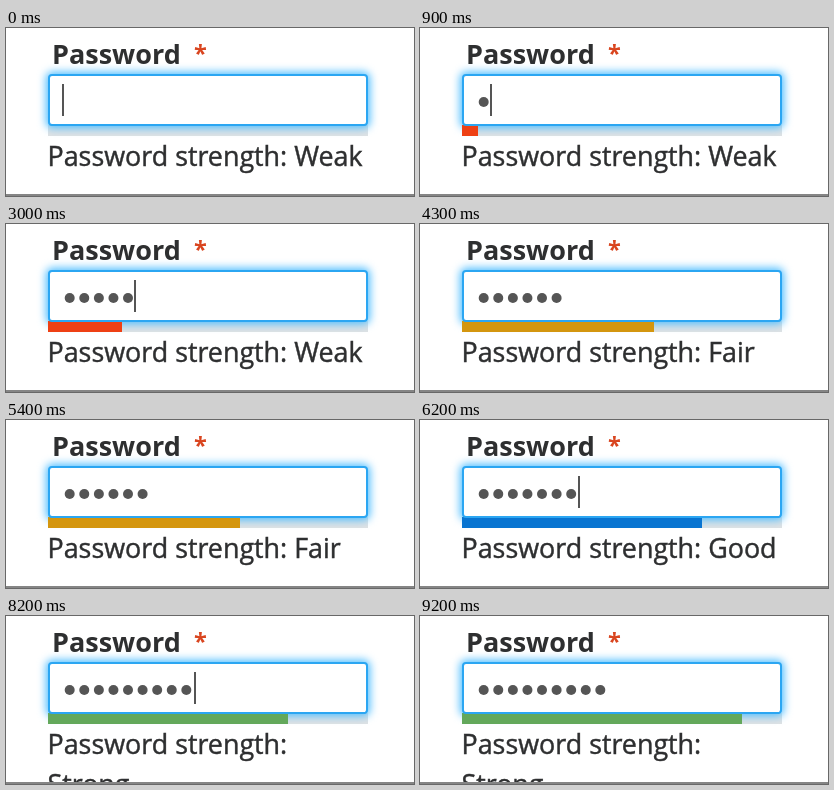
An HTML page that plays this animation: 408x168 px, repeating every 9.6 s.

```html
<!DOCTYPE html>
<html lang="en">
<head>
<meta charset="utf-8">
<title>Password strength</title>
<style>
  html, body { margin: 0; width: 100%; height: 100%; overflow: hidden; background: #fff; }
  svg { display: block; }
  text { font: 26.85px "Open Sans", "Noto Sans", sans-serif; fill: #2e2f30; stroke: #2e2f30; stroke-width: .45px; }
  .title { font-size: 27px; font-weight: 700; stroke: none; }
  .star { font-size: 23.5px; fill: #d9451f; }
  .glow { filter: blur(4px); }
</style>
</head>
<body>
<svg width="408" height="168" viewBox="0 0 408 168">
  <text class="title" x="46" y="36">Password</text>
  <text class="title star" x="188" y="33.5">*</text>
  <rect x="42" y="97" width="320" height="11" fill="#dfe2e4"/>
  <rect class="glow" x="40" y="44" width="324" height="56" rx="6" fill="#4dbdff"/>
  <rect id="bar" x="42" y="97" height="11"/>
  <rect x="43" y="47" width="318" height="50" rx="3" fill="#fff" stroke="#2ba6f2" stroke-width="2"/>
  <g id="dots" fill="#555"></g>
  <rect id="caret" y="56" width="2" height="32" fill="#555"/>
  <text id="label" x="41.5" y="137.5"></text>
  <text id="wrapped" x="41.5" y="177.5"></text>
  <rect y="166" width="408" height="2" fill="#858585"/>
</svg>
<script>
const LOOP = 9600, STEP = 100, GROW = 500, LAG = 50, PITCH = 14.58;
const $ = id => document.getElementById(id);
const levels = {
  Weak: '#ee4014', Fair: '#d4960f', Good: '#0874d1', Strong: '#63a85b'
};
// Key presses: time, meter percentage, rating
const keys = [
  [300, 5, 'Weak'], [1200, 10, 'Weak'], [1700, 15, 'Weak'],
  [2200, 20, 'Weak'], [2700, 25, 'Weak'], [3200, 60, 'Fair'],
  [5600, 75, 'Good'], [7200, 75, 'Good'], [8200, 87.5, 'Strong']
];
const caretOff = [[100, 300], [4300, 4800], [5300, 5600], [6600, 7100], [7700, 8200], [9200, LOOP]];

const dots = keys.map((_, i) => {
  const dot = document.createElementNS('http://www.w3.org/2000/svg', 'circle');
  dot.setAttribute('cx', 63.7 + i * PITCH);
  dot.setAttribute('cy', 74);
  dot.setAttribute('r', 5);
  return $('dots').appendChild(dot);
});

// CSS ease-out: cubic-bezier(0, 0, .58, 1)
function easeOut(x) {
  if (x <= 0) return 0;
  if (x >= 1) return 1;
  let lo = 0, hi = 1;
  for (let i = 0; i < 20; i++) {
    const u = (lo + hi) / 2;
    if (1.74 * u * u * (1 - u) + u ** 3 < x) lo = u; else hi = u;
  }
  return lo * lo * (3 - 2 * lo);
}

function draw(t) {
  const count = keys.filter(k => k[0] <= t).length;
  const [start, goal, level] = keys[count - 1] || [0, 0, 'Weak'];
  const from = count > 1 ? keys[count - 2][1] : 0;
  const percent = from + (goal - from) * easeOut((t - start - LAG) / GROW);
  const wraps = level === 'Strong';

  dots.forEach((dot, i) => dot.setAttribute('visibility', i < count ? 'visible' : 'hidden'));
  // The meter snaps to two-pixel units, as does the caret
  $('bar').setAttribute('width', 2 * Math.floor(percent * 1.6));
  $('bar').setAttribute('fill', levels[level]);
  $('caret').setAttribute('x', 2 * Math.round(28 + count * PITCH / 2));
  $('caret').setAttribute('visibility', caretOff.some(([a, b]) => t >= a && t < b) ? 'hidden' : 'visible');
  $('label').textContent = 'Password strength:' + (wraps ? '' : ' ' + level);
  $('wrapped').textContent = wraps ? level : '';
}

const origin = performance.now();
function tick() {
  const t = (performance.now() - origin) % LOOP;
  draw(Math.floor(t / STEP) * STEP);
  requestAnimationFrame(tick);
}
tick();
</script>
</body>
</html>
```
